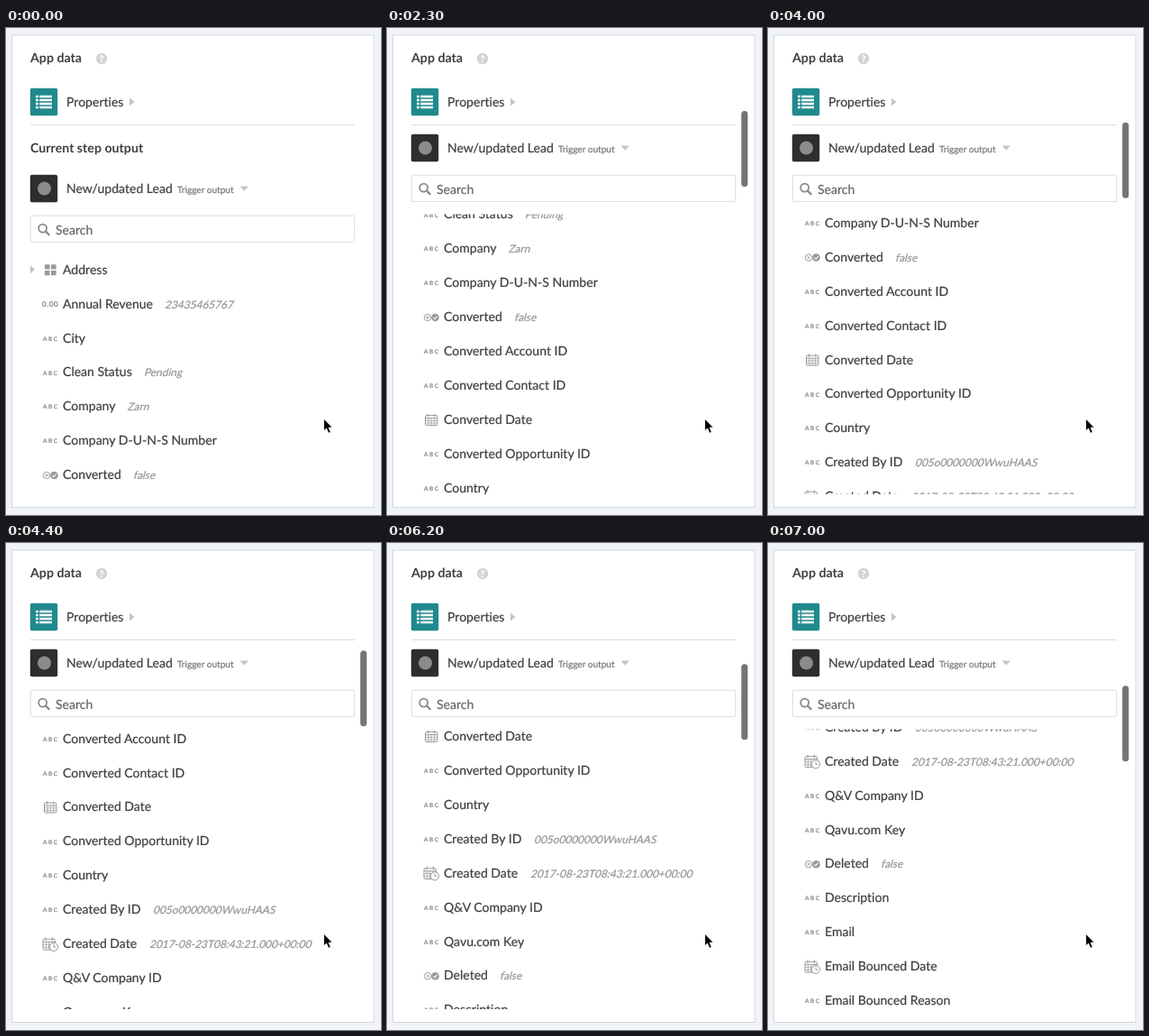
Animation of 416x540 px, one loop 7.4 s. Source, as an HTML page:

```html
<!DOCTYPE html>
<html lang="en">
<head>
<meta charset="utf-8">
<title>App data</title>
<style>
  html, body { margin: 0; width: 100%; height: 100%; overflow: hidden; background: #f0f4f8; }
  svg { display: block; width: 416px; height: 540px; }
  text {
    font: 14.05px Lato, sans-serif; font-variant-ligatures: none; text-rendering: geometricPrecision;
    fill: #404040; stroke: #404040; stroke-width: .22px; white-space: pre;
  }
  .title { font-size: 14.2px; font-weight: 700; stroke: none; }
  .hint { font-size: 10.1px; fill: #777; stroke: #777; }
  .search { fill: #666; stroke: #666; }
  .value { font-size: 11.9px; fill: #959595; stroke: #959595; }
  .abc, .num { font-size: 6.4px; font-weight: 700; letter-spacing: 1.6px; fill: #929292; stroke: #929292; }
  .num { font-size: 8.2px; letter-spacing: .5px; }
  .line { fill: none; stroke: #999; }
</style>
</head>
<body>
<svg viewBox="0 0 416 540">
  <defs>
    <clipPath id="body"><rect x="8" y="108" width="399" height="409"/></clipPath>
    <clipPath id="listArea"><rect id="listClip" x="8" width="399"/></clipPath>

    <g id="abc"><text class="abc" x="41" y="3">ABC</text></g>
    <g id="num"><text class="num" x="40" y="3.7">0.00</text></g>
    <g id="group" fill="#999">
      <path d="M27 -4.5L32 0L27 4.5Z" fill="#c4c4c4"/>
      <rect x="43" y="-5.5" width="5.6" height="5.3" rx=".6"/>
      <rect x="50" y="-5.5" width="5.6" height="5.3" rx=".6"/>
      <rect x="43" y="1.2" width="5.6" height="5.3" rx=".6"/>
      <rect x="50" y="1.2" width="5.6" height="5.3" rx=".6"/>
    </g>
    <g id="bool" class="line">
      <circle cx="45" cy=".7" r="3.8" stroke-width=".9"/>
      <path d="M43.4 -.9l3.2 3.2m0 -3.2l-3.2 3.2" stroke-width=".9"/>
      <circle cx="53.5" cy=".7" r="4.3" fill="#999" stroke="none"/>
      <path d="M51.4 .8l1.6 1.6l2.7 -3.2" stroke="#fff" stroke-width="1.1"/>
    </g>
    <g id="date" class="line">
      <rect x="42.5" y="-4.5" width="13.4" height="11" rx="1.2"/>
      <path d="M42.5 -1.5h13.4M45.5 -6.2v3.2M52.9 -6.2v3.2"/>
      <path d="M42.5 1.3h13.4M42.5 4h13.4M45.9 -1.5v8M49.2 -1.5v8M52.5 -1.5v8" stroke-width=".7"/>
    </g>
    <g id="time" class="line">
      <rect x="41" y="-5" width="13.4" height="11.8" rx="1.2"/>
      <path d="M41 -2h13.4M44 -7v3.4M51.4 -7v3.4"/>
      <path d="M41 1h13.4M41 4h13.4M44.4 -2v8.8M47.7 -2v8.8M51 -2v8.8" stroke-width=".7"/>
      <circle cx="53" cy="3.6" r="4.6" fill="#fff"/>
      <path d="M53 .8v3h2.4"/>
    </g>
  </defs>

  <rect width="416" height="540" fill="#f0f4f8"/>
  <rect x="6.5" y="8" width="401.5" height="523.5" fill="#fff" stroke="#d3d7db"/>

  <text class="title" x="27" y="38">App data</text>
  <circle cx="106" cy="34" r="6.2" fill="#d4d4d4"/>
  <text x="106" y="37.8" text-anchor="middle" style="font-size:10.5px;font-weight:900;fill:#fff;stroke:none">?</text>

  <rect x="26.8" y="66.8" width="30.4" height="30.4" rx="2" fill="#20898d"/>
  <path d="M33 76.1h2.8m1.4 0H51M33 80.1h2.8m1.4 0H51M33 84.1h2.8m1.4 0H51M33 88.1h2.8m1.4 0H51" stroke="#fff" stroke-width="2.5"/>
  <text x="67" y="86.8">Properties</text>
  <path d="M137 77.5L142.5 82L137 86.5Z" fill="#c4c4c4"/>
  <path d="M27 107.3H387" stroke="#dadada"/>

  <g clip-path="url(#body)">
    <g id="head">
      <text class="title" x="27" y="137.7">Current step output</text>
      <rect x="26.8" y="162.8" width="30.4" height="30.4" rx="2" fill="#2f2d2e"/>
      <circle cx="42.5" cy="178" r="7.5" fill="#8b8b8b"/>
      <text x="67" y="182.8">New/updated Lead</text>
      <text class="hint" x="190" y="183">Trigger output</text>
      <path d="M259.5 175.5H269L264.2 180.7Z" fill="#c6c6c6"/>
      <rect x="27.4" y="208.2" width="359.3" height="29.2" rx="1.5" fill="#fff" stroke="#dcdcdc"/>
      <circle cx="40.7" cy="222.1" r="4.5" fill="none" stroke="#8a8a8a" stroke-width="1.8"/>
      <path d="M44 225.5L47.6 229.1" stroke="#8a8a8a" stroke-width="2.3" stroke-linecap="round"/>
      <text class="search" x="55" y="228.5">Search</text>
    </g>
    <g clip-path="url(#listArea)"><g id="list"></g></g>
  </g>

  <rect id="thumb" x="393.1" width="7.1" height="84" rx="3.5" fill="#757575"/>
  <g stroke-linejoin="round">
    <path id="arrow" d="M352.5 433.2v13.6l3 -2.8l2.2 5.2l2.5 -1l-2.2 -5.1h4.2Z" fill="#000" stroke="#fff" stroke-width=".8"/>
  </g>
</svg>
<script>
const LOOP = 7400, STEP = 100, PITCH = 37.92, STICK = 45;

// icon, label, value, value x
const rows = [
  ['group', 'Address'],
  ['num', 'Annual Revenue', '23435465767', 176],
  ['abc', 'City'],
  ['abc', 'Clean Status', 'Pending', 153],
  ['abc', 'Company', 'Zarn', 134.5],
  ['abc', 'Company D-U-N-S Number'],
  ['bool', 'Converted', 'false', 141],
  ['abc', 'Converted Account ID'],
  ['abc', 'Converted Contact ID'],
  ['date', 'Converted Date'],
  ['abc', 'Converted Opportunity ID'],
  ['abc', 'Country'],
  ['abc', 'Created By ID', '005o0000000WwuHAAS', 163],
  ['time', 'Created Date', '2017-08-23T08:43:21.000+00:00', 159],
  ['abc', 'Q&V Company ID'],
  ['abc', 'Qavu.com Key'],
  ['bool', 'Deleted', 'false', 125],
  ['abc', 'Description'],
  ['abc', 'Email'],
  ['time', 'Email Bounced Date'],
  ['abc', 'Email Bounced Reason']
];

// time in ms, scroll offset in px
const keys = [
  [0, 0], [1300, 0], [1400, 10], [1600, 33], [2100, 145], [2300, 175],
  [3500, 175], [3600, 182], [4300, 297], [4400, 316.5], [4800, 357],
  [5900, 357], [6000, 364], [6200, 395], [6500, 463], [7000, 519], [LOOP, 519]
];
const fades = [[2900, 3], [5400, 2]];
const shown = [[1400, 3100], [3600, 5500], [6000, LOOP]];

const byId = id => document.getElementById(id);
const head = byId('head'), list = byId('list'), clip = byId('listClip'), thumb = byId('thumb');

function add(parent, name, attrs, text) {
  const el = document.createElementNS('http://www.w3.org/2000/svg', name);
  for (const k in attrs) el.setAttribute(k, attrs[k]);
  if (text) el.textContent = text;
  return parent.appendChild(el);
}

rows.forEach(([icon, label, value, x], i) => {
  const g = add(list, 'g', { transform: `translate(0 ${267.8 + i * PITCH})` });
  add(g, 'use', { href: '#' + icon });
  add(g, 'text', { x: 63, y: 4.9 }, label);
  // Slanted upright letters rather than the italic face
  if (value) add(g, 'text', { class: 'value', transform: `translate(${x} 4.9) skewX(-14)` }, value);
});

const slope = i => (keys[i + 1][1] - keys[i][1]) / (keys[i + 1][0] - keys[i][0]);

// Monotone tangent: harmonic mean of the neighbouring slopes
function tangent(i) {
  if (i === 0 || i === keys.length - 1) return 0;
  const a = slope(i - 1), b = slope(i);
  return a * b > 0 ? 2 * a * b / (a + b) : 0;
}

function scrollAt(t) {
  let i = 0;
  while (i < keys.length - 2 && t >= keys[i + 1][0]) i++;
  const [t0, a] = keys[i], [t1, b] = keys[i + 1];
  const d = t1 - t0, u = (t - t0) / d, v = 1 - u;
  return a * v * v * (1 + 2 * u) + b * u * u * (3 - 2 * u)
    + d * u * v * (v * tangent(i) - u * tangent(i + 1));
}

function thumbAlpha(t) {
  if (!shown.some(([from, to]) => t >= from && t < to)) return 0;
  const fade = fades.find(([from, n]) => t >= from && t < from + n * STEP);
  return fade ? 1 - ((t - fade[0]) / STEP + 1) / fade[1] : 1;
}

function draw(time) {
  const t = Math.floor(time % LOOP / STEP) * STEP;
  const s = scrollAt(t), lift = Math.min(s, STICK), top = 206.5 + STICK - lift;
  head.setAttribute('transform', `translate(0 ${-lift})`);
  list.setAttribute('transform', `translate(0 ${-s})`);
  clip.setAttribute('y', top);
  clip.setAttribute('height', 517 - top);
  thumb.setAttribute('y', 58.5 + 0.192 * s);
  thumb.setAttribute('opacity', thumbAlpha(t));
}

const start = performance.now();
function tick() {
  draw(performance.now() - start);
  requestAnimationFrame(tick);
}
tick();
</script>
</body>
</html>
```
